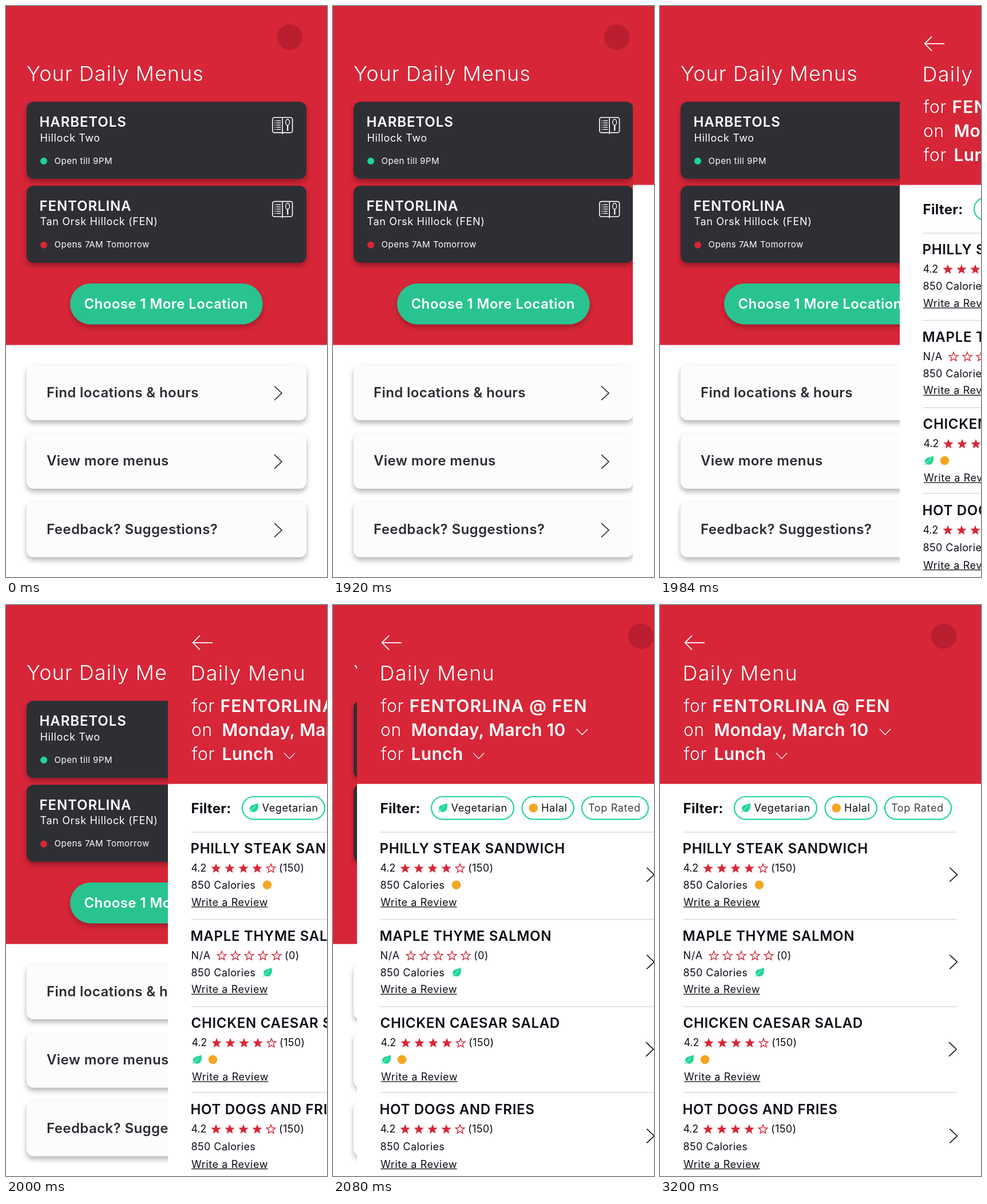
An HTML page with a canvas that plays this animation: 561x998 px, repeating every 3920 ms.

```html
<!DOCTYPE html>
<html lang="en">
<head>
<meta charset="utf-8">
<title>Daily menus</title>
<style>
  html, body { margin: 0; width: 100%; height: 100%; overflow: hidden; background: #fff; }
  canvas { display: block; width: 561px; height: 998px; }
</style>
</head>
<body>
<canvas id="stage"></canvas>
<script>
const W = 561, H = 998, LOOP = 3920;
const SLIDE_AT = 1920, STEP = 40;
const SLIDE_X = [524, 419, 283, 147, 42, 0];

const RED = '#d72638', LOGO = '#bb1e2f', DARK = '#2e2f35', INK = '#0b0d17';
const GREEN = '#29c391', MINT = '#20d696', ORANGE = '#f5a623', WHITE = '#fff';
const LIGHT = 350, BOOK = 400, MEDIUM = 600, BOLD = 700;

const canvas = document.getElementById('stage');
const ctx = canvas.getContext('2d');
const ratio = window.devicePixelRatio || 1;
canvas.width = W * ratio;
canvas.height = H * ratio;

function text(str, x, y, size, weight, color, track = 0) {
  ctx.font = `${weight} ${size}px Inter, sans-serif`;
  ctx.letterSpacing = `${track}px`;
  ctx.fillStyle = color;
  ctx.fillText(str, x, y);
  return ctx.measureText(str).width - track;
}

function rect(x, y, w, h, color) {
  ctx.fillStyle = color;
  ctx.fillRect(x, y, w, h);
}

function line(points, color, width) {
  ctx.beginPath();
  points.forEach(([x, y]) => ctx.lineTo(x, y));
  ctx.strokeStyle = color;
  ctx.lineWidth = width;
  ctx.stroke();
}

function disc(x, y, r, color) {
  ctx.beginPath();
  ctx.arc(x, y, r, 0, Math.PI * 2);
  ctx.fillStyle = color;
  ctx.fill();
}

function panel(x, y, w, h, r, color, shade) {
  ctx.save();
  ctx.shadowColor = `rgba(0,0,0,${shade})`;
  ctx.shadowBlur = 10 * ratio;
  ctx.shadowOffsetY = 5 * ratio;
  ctx.beginPath();
  ctx.roundRect(x, y, w, h, r);
  ctx.fillStyle = color;
  ctx.fill();
  ctx.restore();
}

function chevronRight(x, y, color) {
  line([[x - 13, y - 12.3], [x, y], [x - 13, y + 12.3]], color, 1.6);
}

function chevronDown(x, y) {
  line([[x - 9.5, y - 5], [x, y + 5], [x + 9.5, y - 5]], WHITE, 1.3);
}

function star(x, y, filled) {
  ctx.beginPath();
  const outer = filled ? 9.2 : 8.2;
  for (let i = 0; i < 10; i++) {
    const r = i % 2 ? outer * 0.43 : outer;
    const a = i * Math.PI / 5 - Math.PI / 2;
    ctx.lineTo(x + r * Math.cos(a), y + 0.6 + r * Math.sin(a));
  }
  ctx.closePath();
  if (filled) {
    ctx.fillStyle = RED;
    ctx.fill();
  } else {
    ctx.strokeStyle = RED;
    ctx.lineWidth = 1.4;
    ctx.stroke();
  }
}

function leaf(x, y) {
  ctx.save();
  ctx.translate(x, y);
  ctx.beginPath();
  ctx.moveTo(7.5, -8);
  ctx.bezierCurveTo(9, 0, 7, 7.5, -1, 7.3);
  ctx.quadraticCurveTo(-3.5, 7, -4.6, 5.6);
  ctx.lineTo(-7, 8);
  ctx.lineTo(-7.8, 7.2);
  ctx.lineTo(-5.8, 4.6);
  ctx.bezierCurveTo(-10.5, -5, 1, -5, 7.5, -8);
  ctx.fillStyle = MINT;
  ctx.fill();
  line([[-5.6, 5.4], [-1, 1], [3, -3.4]], WHITE, 0.8);
  ctx.restore();
}

function menuIcon(x, y) {
  ctx.save();
  ctx.translate(x, y);
  ctx.strokeStyle = WHITE;
  ctx.lineWidth = 1.6;
  ctx.lineJoin = 'round';
  ctx.beginPath();
  ctx.roundRect(0.8, 0.8, 34.8, 26.6, 3.5);
  ctx.stroke();
  line([[18.2, 2], [18.2, 30]], WHITE, 1.6);
  for (let i = 0; i < 5; i++) {
    const row = 6.5 + i * 3.8;
    line([[4.3, row], [5.9, row]], WHITE, 1.4);
    line([[7.3, row], [15.3, row]], WHITE, 1.4);
  }
  ctx.beginPath();
  ctx.ellipse(27.2, 9.2, 3.4, 5.2, 0, 0, Math.PI * 2);
  ctx.stroke();
  line([[27.2, 14.4], [27.2, 24]], WHITE, 2.4);
  ctx.restore();
}

function placeCard(y, name, place, status, dot) {
  panel(36, y, 489, 134.5, 12, DARK, 0.3);
  text(name, 58.5, y + 43.5, 24, MEDIUM, WHITE, 0.9);
  text(place, 59.5, y + 69, 18, BOOK, WHITE, 0.65);
  disc(66, y + 103.5, 6, dot);
  text(status, 84.5, y + 108, 15, BOOK, WHITE, 0.5);
  menuIcon(465, y + 26.5);
}

function linkCard(y, label) {
  panel(36, y, 489, 96.3, 12, '#fcfcfc', 0.3);
  text(label, 71, y + 56, 24, MEDIUM, '#2b2b33', 0.4);
  chevronRight(482, y + 49, '#2b2b33');
}

function drawHome() {
  rect(0, 0, W, H, WHITE);
  rect(0, 0, W, 592.5, RED);
  disc(496, 54.5, 22.3, LOGO);
  text('Your Daily Menus', 36, 131, 36, LIGHT, WHITE, 1);
  placeCard(167.5, 'HARBETOLS', 'Hillock Two', 'Open till 9PM', MINT);
  placeCard(314.3, 'FENTORLINA', 'Tan Orsk Hillock (FEN)', 'Opens 7AM Tomorrow', RED);
  panel(112, 485, 336.7, 71.5, 35.75, GREEN, 0.25);
  text('Choose 1 More Location', 136.5, 528.5, 24, MEDIUM, WHITE, 0.4);
  linkCard(627.7, 'Find locations & hours');
  linkCard(747.4, 'View more menus');
  linkCard(867.1, 'Feedback? Suggestions?');
}

function pill(x, w, label, textX, color) {
  ctx.beginPath();
  ctx.roundRect(x, 335, w, 39.6, 19.8);
  ctx.strokeStyle = MINT;
  ctx.lineWidth = 2.2;
  ctx.stroke();
  text(label, textX, 361, 18, BOOK, color, 0.65);
}

function dish({ x = 41, y, name, score, stars, votes, gap = 0, calY, leafX, halalX, iconY, reviewY }) {
  text(name, x - 1.5, y, 24, MEDIUM, INK, 0.7);
  text(score, x - 0.5, y + 32, 18, BOOK, INK, gap ? 0.8 : -0.2);
  for (let i = 0; i < 5; i++) star(x + 43 + gap + i * 24, y + 26, i < stars);
  text(votes, x + 153 + gap, y + 32, 18, BOOK, INK, 0.4);
  if (calY) text('850 Calories', x - 0.5, calY, 18, BOOK, INK, 0.4);
  if (leafX) leaf(leafX, iconY);
  if (halalX) disc(halalX, iconY, 7.8, ORANGE);
  const w = text('Write a Review', x, reviewY, 18, BOOK, INK, 0.6);
  rect(x, reviewY + 1.4, w, 1.3, INK);
}

const rated = { score: '4.2', stars: 4, votes: '(150)' };
const dishes = [
  { ...rated, y: 434, name: 'PHILLY STEAK SANDWICH', calY: 496, halalX: 173.5, iconY: 489.3, reviewY: 525.7 },
  { score: 'N/A', stars: 0, votes: '(0)', gap: 10, y: 586.7, name: 'MAPLE THYME SALMON',
    calY: 648.5, leafX: 174, iconY: 642, reviewY: 678.3 },
  { ...rated, x: 42, y: 739.3, name: 'CHICKEN CAESAR SALAD', leafX: 51, halalX: 78.5, iconY: 794.5, reviewY: 831 },
  { ...rated, y: 890, name: 'HOT DOGS AND FRIES', calY: 953, reviewY: 983.5 }
];

function drawMenu() {
  rect(0, 0, W, H, WHITE);
  rect(0, 0, W, 312.7, RED);
  disc(496, 54.5, 22.3, LOGO);
  line([[78, 65.8], [44, 65.8]], WHITE, 1.8);
  line([[56, 53.3], [43.7, 65.8], [56, 78.3]], WHITE, 1.8);

  text('Daily Menu', 39.5, 132.3, 36, LIGHT, WHITE, 1.3);
  text('for', 41.5, 187.3, 30, LIGHT, WHITE, 0.8);
  text('FENTORLINA @ FEN', 91.5, 187.3, 30, MEDIUM, WHITE, 1.1);
  text('on', 41, 229.3, 30, LIGHT, WHITE, 0.6);
  text('Monday, March 10', 94.5, 229.3, 30, MEDIUM, WHITE, 0.3);
  chevronDown(393.5, 221.8);
  text('for', 41.5, 271.3, 30, LIGHT, WHITE, 0.8);
  text('Lunch', 94.5, 271.3, 30, MEDIUM, WHITE, 0.3);
  chevronDown(212.5, 263.6);

  text('Filter:', 40.5, 364, 24, BOLD, INK, 0.3);
  pill(130, 144, 'Vegetarian', 164.5, INK);
  leaf(150, 354.5);
  pill(288.5, 90.3, 'Halal', 322, INK);
  disc(308.2, 354.8, 7.8, ORANGE);
  pill(393, 116, 'Top Rated', 404, '#3c3d45');

  for (const y of [397, 549.5, 702, 852]) rect(40.5, y - 0.8, 478.5, 1.6, '#dcdcde');
  dishes.forEach(dish);
  chevronRight(519.3, 471.3, INK);
  chevronRight(519.3, 623.8, INK);
  chevronRight(518, 776.5, INK);
  chevronRight(519.3, 928, INK);
}

function render() {
  const t = performance.now() % LOOP;
  ctx.setTransform(ratio, 0, 0, ratio, 0, 0);
  const step = Math.floor((t - SLIDE_AT) / STEP);
  const x = step < 0 ? W : SLIDE_X[Math.min(step, SLIDE_X.length - 1)];
  if (x > 0) drawHome();
  if (x < W) {
    ctx.translate(x, 0);
    drawMenu();
  }
  requestAnimationFrame(render);
}
render();
</script>
</body>
</html>
```
